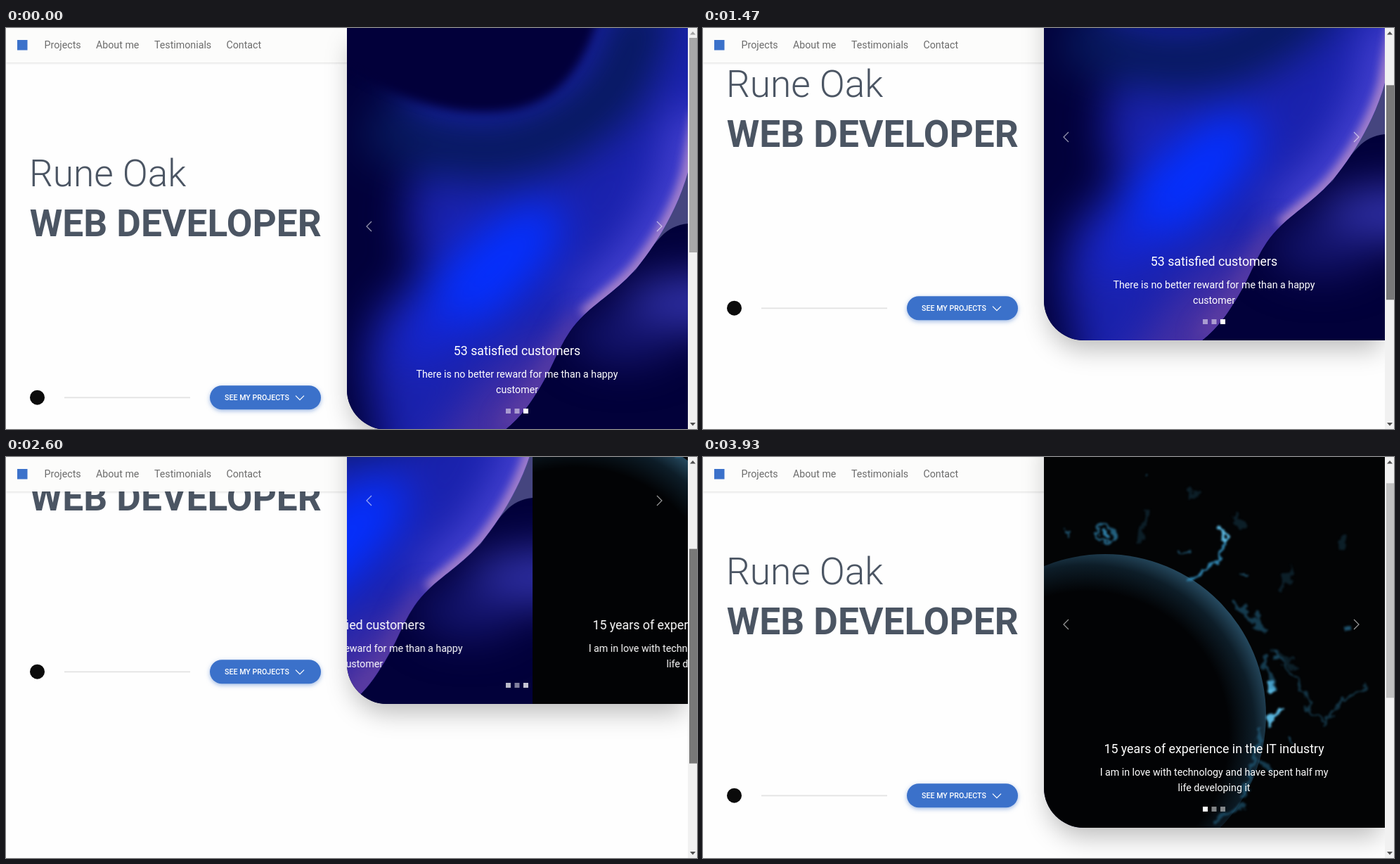
An HTML page that plays this animation: 983 px wide and 570 px high, repeating every 4.59 s.

```html
<!DOCTYPE html>
<html lang="en">
<head>
<meta charset="utf-8">
<title>Portfolio</title>
<style>
  html, body { margin: 0; width: 100%; height: 100%; overflow: hidden; background: #fefefe; }
  body { position: relative; font: 14.22px Roboto, sans-serif; }
  svg { display: block; position: absolute; left: 0; top: 0; }
  .scroll { position: absolute; top: 0; will-change: transform; }
  #intro { left: 0; }
  #nav { position: absolute; left: 0; top: 0; width: 970px; height: 49px; background: #fcfcfb; box-shadow: 0 1px 3px rgba(0,0,0,.13); }
  #carousel { left: 485px; width: 485px; height: 571px; overflow: hidden; background: #02013c;
    border-bottom-left-radius: 57px; box-shadow: 0 18px 36px -6px rgba(0,0,0,.27); }
  #track { position: absolute; left: 0; top: 0; will-change: transform; }
  #space { left: 485px; }
  .caption { fill: #fff; text-anchor: middle; }
  .heading { font-size: 17.78px; }
  #bar { position: absolute; left: 970px; top: 0; width: 13px; height: 570px; background: #f1f1f1; }
  #thumb { position: absolute; left: 1.5px; top: 14px; width: 11.5px; height: 305px; }
</style>
</head>
<body>
<svg id="intro" class="scroll" width="485" height="571">
  <g fill="#4b5563" font-size="53.2">
    <text x="33" y="225" font-weight="300">Rune Oak</text>
    <text x="33.7" y="296" font-weight="700">WEB DEVELOPER</text>
  </g>
  <circle cx="44.5" cy="525.2" r="10.5" fill="#0b0b0b"/>
  <path d="M83 525.3H262" stroke="#e2e2e2" stroke-width="1.8"/>
  <rect x="290" y="508.2" width="158" height="34" rx="17" fill="#3b71ca" style="filter:drop-shadow(0 2px 3px rgba(59,113,202,.5))"/>
  <text x="311" y="528.7" font-size="10.67" font-weight="500" fill="#fff">SEE MY PROJECTS</text>
  <path d="M412 522.7l6 6 6-6" fill="none" stroke="#fff" stroke-width="1.2"/>
</svg>

<div id="nav">
  <svg width="485" height="49" fill="#6c6c6c">
    <rect x="16" y="17" width="14.5" height="14.5" fill="#3b71ca"/>
    <text x="54.5" y="28.5">Projects</text>
    <text x="128" y="28.5">About me</text>
    <text x="211" y="28.5">Testimonials</text>
    <text x="313.5" y="28.5">Contact</text>
  </svg>
</div>

<div id="carousel" class="scroll">
  <div id="track">
    <svg id="waves" width="485" height="571" viewBox="485 0 485 571">
      <defs>
        <g id="blurs" color-interpolation-filters="sRGB">
          <filter id="soft" filterUnits="userSpaceOnUse" x="300" y="-150" width="850" height="870"><feGaussianBlur stdDeviation="30"/></filter>
          <filter id="glow" filterUnits="userSpaceOnUse" x="300" y="-150" width="850" height="870"><feGaussianBlur stdDeviation="16"/></filter>
          <filter id="edge" filterUnits="userSpaceOnUse" x="300" y="-150" width="850" height="870"><feGaussianBlur stdDeviation="7"/></filter>
        </g>
        <path id="ridge" d="M985 120L970 205C958 250 930 300 902 335C878 366 845 386 822 408"/>
        <clipPath id="band"><path d="M485 0H970V205C958 250 930 300 902 335C878 366 845 386 822 408C788 440 782 478 755 518C742 540 728 556 710 571H485Z"/></clipPath>
      </defs>
      <rect x="485" width="485" height="571" fill="#02013a"/>
      <g filter="url(#soft)">
        <ellipse cx="990" cy="390" rx="115" ry="40" fill="#3030a8"/>
        <ellipse cx="880" cy="440" rx="75" ry="38" fill="#14146e"/>
      </g>
      <path d="M970 205V278C938 281 925 302 893 348Z" fill="#45457f"/>
      <g clip-path="url(#band)">
        <rect x="485" width="485" height="571" fill="#1a22ae"/>
        <g filter="url(#soft)">
          <path d="M400 -60H560L580 170L570 280L590 350L530 400L510 470L540 640H400Z" fill="#02013a"/>
          <path d="M520 130C640 195 770 195 870 80L915 -40" fill="none" stroke="#07195c" stroke-width="85"/>
          <ellipse cx="690" cy="345" rx="130" ry="52" transform="rotate(-43 690 345)" fill="#0430ff"/>
          <ellipse cx="605" cy="432" rx="60" ry="26" transform="rotate(-43 605 432)" fill="#1226d8"/>
          <path d="M580 640L680 500L800 420L760 640Z" fill="#4530a2"/>
          <use href="#ridge" fill="none" stroke="#5a50e0" stroke-width="70" opacity=".75"/>
        </g>
        <use href="#ridge" fill="none" stroke="#c094cc" stroke-width="18" filter="url(#edge)" opacity=".85"/>
        <path d="M822 408C788 440 782 478 755 518L710 571" fill="none" stroke="#754aa0" stroke-width="18" filter="url(#glow)"/>
        <path d="M470 48C560 104 620 120 680 120C765 120 820 82 850 -40H470Z" fill="#02003a" filter="url(#edge)"/>
      </g>
      <g class="caption">
        <text class="heading" x="727" y="465">53 satisfied customers</text>
        <text x="727" y="497">There is no better reward for me than a happy</text>
        <text x="727" y="518.5">customer</text>
      </g>
    </svg>

    <svg id="space" width="485" height="571" viewBox="485 0 485 571">
      <defs>
        <radialGradient id="planet" gradientUnits="userSpaceOnUse" cx="545" cy="438" r="267">
          <stop offset=".76" stop-color="#020305"/>
          <stop offset=".9" stop-color="#0d1d28"/>
          <stop offset="1" stop-color="#264a60"/>
        </radialGradient>
        <filter id="wisp" filterUnits="userSpaceOnUse" x="485" y="0" width="485" height="571" color-interpolation-filters="sRGB">
          <feTurbulence type="fractalNoise" baseFrequency=".06" numOctaves="3" seed="4" result="noise"/>
          <feDisplacementMap in="SourceGraphic" in2="noise" scale="24" xChannelSelector="R" yChannelSelector="G"/>
          <feGaussianBlur stdDeviation="1.6"/>
        </filter>
      </defs>
      <rect x="485" width="485" height="571" fill="#030405"/>
      <circle cx="572" cy="411" r="229" fill="url(#planet)"/>
      <g filter="url(#wisp)" fill="none" stroke="#2e7fa8" stroke-linecap="round">
        <path d="M740 140L743 168L728 197L692 220" stroke-width="5"/>
        <path d="M739 142L743 160M807 364V372M826 398L803 421" stroke="#58b4dc" stroke-width="6"/>
        <circle cx="573" cy="153" r="12" stroke-width="4" opacity=".75"/>
        <circle cx="572" cy="152" r="2" stroke-width="5"/>
        <path d="M517 150V160M630 69V70M768 207L778 210M680 177L690 181M912 288L917 286M838 443V446" stroke-width="4" opacity=".65"/>
        <path d="M757 250L775 270L792 285M787 265L795 290M800 330L812 372M795 480L808 484M735 560L765 540M795 432L770 520" stroke-width="7" opacity=".45"/>
        <path d="M815 325L850 370L862 400L885 422L906 393L942 372" stroke-width="3.5" opacity=".4"/>
        <path d="M825 232L835 205M812 322L845 345M695 90L700 103M630 125L620 165M755 125L765 140M910 160V170" stroke-width="7" opacity=".22"/>
      </g>
      <g class="caption">
        <text class="heading" x="727" y="465">15 years of experience in the IT industry</text>
        <text x="727" y="497">I am in love with technology and have spent half my</text>
        <text x="727" y="518.5">life developing it</text>
      </g>
    </svg>
  </div>
  <svg width="485" height="571" viewBox="485 0 485 571">
    <path d="M520 275l-7 7 7 7M926 275l7 7-7 7" fill="none" stroke="#fff" stroke-width="1.2" opacity=".6"/>
    <g fill="#fff">
      <rect id="firstDot" x="711" y="541" width="7" height="7"/>
      <rect x="723.5" y="541" width="7" height="7" opacity=".5"/>
      <rect id="lastDot" x="736" y="541" width="7" height="7"/>
    </g>
  </svg>
</div>

<div id="bar">
  <svg width="13" height="570"><path id="up" d="M3 9.5L7 5l4 4.5z"/><path d="M3 561L7 565.5l4-4.5z" fill="#505050"/></svg>
  <div id="thumb"></div>
</div>

<script>
const LOOP = 4590, FPS = 15, SLIDE_WIDTH = 485;
const $ = id => document.getElementById(id);
const scrollers = document.querySelectorAll('.scroll');

// [time, scroll offset, speed]
const scrollKeys = [
  [333, 0, 0], [733, 17, .08], [1200, 82, .155], [1400, 115, .172], [1733, 174, .17], [2133, 230, 0],
  [2370, 230, 0], [2867, 186, -.17], [3333, 96, -.17], [3867, 44, -.04]
];

function scrollAt(t) {
  const next = scrollKeys.findIndex(key => key[0] > t);
  if (next === 0) return 0;
  if (next < 0) return 44;
  const [t0, y0, v0] = scrollKeys[next - 1], [t1, y1, v1] = scrollKeys[next];
  const h = t1 - t0, u = (t - t0) / h, w = 1 - u;
  return y0 * w * w * (1 + 2 * u) + y1 * u * u * (3 - 2 * u) + h * u * w * (v0 * w - v1 * u);
}

// cubic-bezier(.42, 0, .58, 1)
function easeInOut(x) {
  if (x <= 0 || x >= 1) return x <= 0 ? 0 : 1;
  let lo = 0, hi = 1, u;
  for (let i = 0; i < 24; i++) {
    u = (lo + hi) / 2;
    const bx = 1.26 * u * (1 - u) ** 2 + 1.74 * u * u * (1 - u) + u ** 3;
    if (bx < x) lo = u; else hi = u;
  }
  return u * u * (3 - 2 * u);
}

function draw(time) {
  const t = Math.floor((time % LOOP + 4) * FPS / 1000) * 1000 / FPS;
  const scroll = Math.round(scrollAt(t));
  const slide = easeInOut((t - 2325) / 580);
  for (const el of scrollers) el.style.transform = `translateY(${-scroll}px)`;
  $('track').style.transform = `translateX(${-SLIDE_WIDTH * slide}px)`;
  $('firstDot').setAttribute('opacity', .5 + slide / 2);
  $('lastDot').setAttribute('opacity', 1 - slide / 2);
  $('thumb').style.transform = `translateY(${scroll * .53}px)`;
  $('thumb').style.background = t < 399 ? '#a8a8a8' : t < 3860 ? '#787878' : '#c1c1c1';
  $('up').setAttribute('fill', scroll ? '#505050' : '#a3a3a3');
}

const start = performance.now();
(function tick() {
  draw(performance.now() - start);
  requestAnimationFrame(tick);
})();
</script>
</body>
</html>
```
